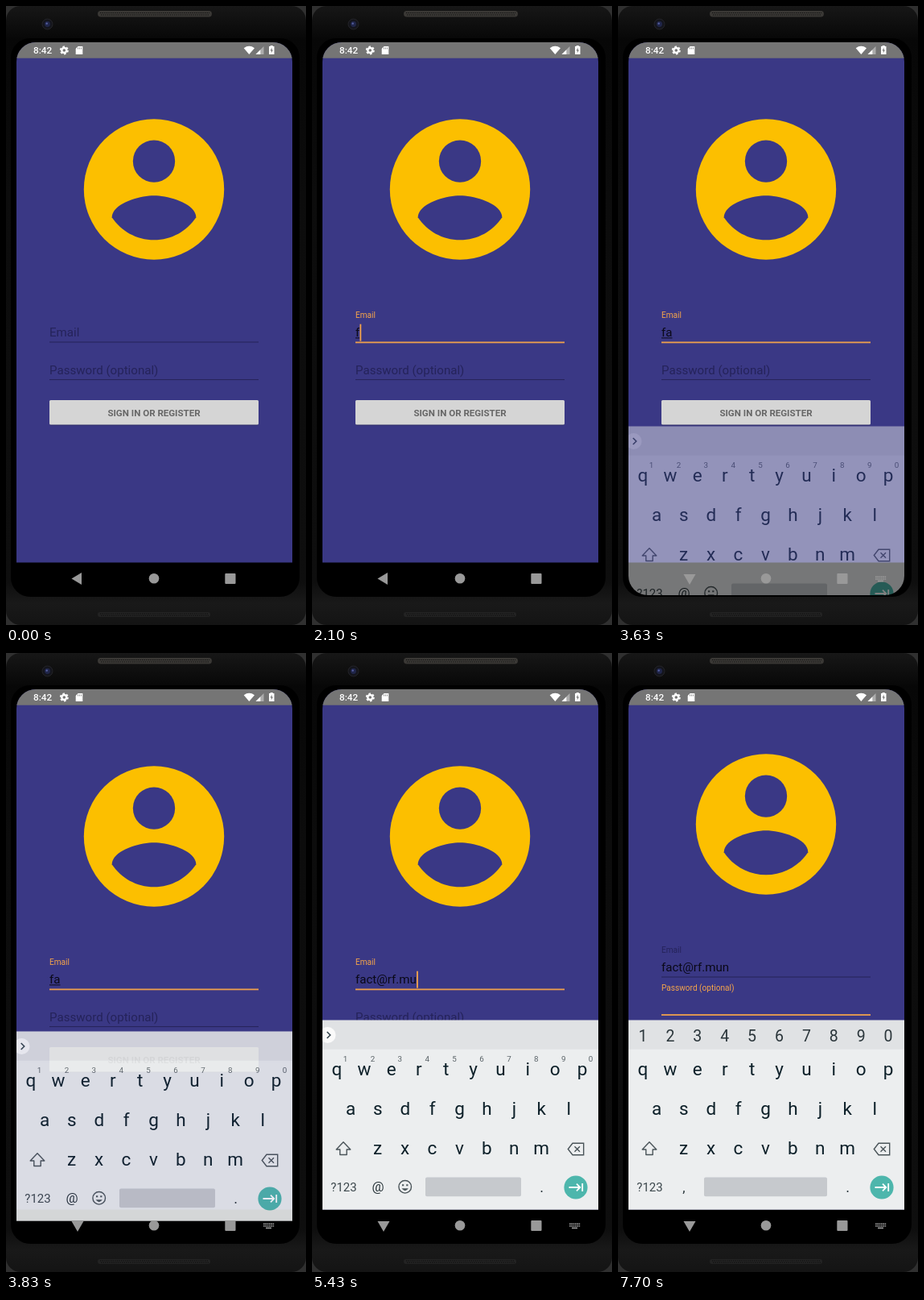
Write an HTML page that moves like this. It is 373 by 768 pixels and loops after 8000 ms.

```html
<!DOCTYPE html>
<html lang="en">
<head>
<meta charset="utf-8">
<title>Sign in</title>
<style>
html, body { margin: 0; width: 100%; height: 100%; overflow: hidden; background: #000; }
svg { display: block; width: 373px; height: 768px; }
text { font-family: Roboto, sans-serif; white-space: pre; }
.mid { text-anchor: middle; }
</style>
</head>
<body>
<svg id="stage" viewBox="0 0 373 768" xmlns="http://www.w3.org/2000/svg">
  <defs>
    <clipPath id="screen"><rect x="13" y="45" width="343" height="686" rx="24"/></clipPath>
    <linearGradient id="shell" x2="0" y2="1">
      <stop offset="0" stop-color="#171717"/><stop offset=".055" stop-color="#070707"/>
      <stop offset=".3" stop-color="#0c0c0c"/><stop offset=".93" stop-color="#0e0e0e"/>
      <stop offset=".965" stop-color="#191919"/><stop offset="1" stop-color="#141414"/>
    </linearGradient>
  </defs>

  <!-- phone body -->
  <rect width="373" height="768" fill="#303030"/>
  <rect x="0" y="0" width="373" height="768" rx="18" fill="url(#shell)"/>
  <rect x="6" y="40" width="359" height="693" rx="24" fill="#000"/>
  <rect x="114" y="6" width="142" height="7.5" rx="3.7" fill="#3a3835"/>
  <path d="M117 8.5H253M118 11H253" stroke="#111" stroke-width="1.2" stroke-dasharray="1.3 1.3"/>
  <rect x="114" y="752" width="140" height="6" rx="3" fill="#232323"/>
  <path d="M117 754H252M118 756.3H252" stroke="#0d0d0d" stroke-width="1.1" stroke-dasharray="1.3 1.3"/>
  <circle cx="51.5" cy="22.5" r="6.5" fill="#14151c" stroke="#242428"/>
  <circle cx="51.5" cy="22.5" r="3.4" fill="#20264a"/>
  <circle cx="50.7" cy="21.7" r="1.2" fill="#5560a0"/>

  <g clip-path="url(#screen)">
    <rect x="13" y="45" width="343" height="646" fill="#3a3885"/>

    <g id="page">
      <g transform="translate(79.36 122.86) scale(8.72)">
        <circle cx="12" cy="12" r="10" fill="#fcbf00"/>
        <circle cx="12" cy="8" r="3" fill="#3a3885"/>
        <path fill="#3a3885" d="M12 19.2c-2.5 0-4.71-1.28-6-3.22.03-1.99 4-3.08 6-3.08 1.99 0 5.97 1.09 6 3.08-1.29 1.94-3.5 3.22-6 3.22z"/>
      </g>
      <text id="mailHint" x="54">Email</text>
      <text id="mail" x="54" y="410" font-size="15.1" fill="#0a0918"></text>
      <rect id="compose" x="54" y="411.4" height="1" fill="#0a0918"/>
      <rect id="mailLine" x="54" width="260"/>
      <text id="passHint" x="54">Password (optional)</text>
      <rect id="passLine" x="54" width="260"/>
      <rect id="caret" width="1.8" height="21" fill="#f5a44a"/>
      <rect x="54" y="490" width="260" height="30.6" rx="2" fill="#2a2865"/>
      <rect x="54" y="489" width="260" height="30.5" rx="1.5" fill="#d5d5d5"/>
      <text class="mid" x="184" y="508.6" font-size="11.55" font-weight="700" fill="#676767">SIGN IN OR REGISTER</text>
    </g>

    <!-- status bar -->
    <rect x="13" y="45" width="343" height="19.7" fill="#757575"/>
    <text x="34" y="59" font-size="11.8" font-weight="500" fill="#fff">8:42</text>
    <g fill="#fff">
      <circle cx="72.3" cy="55" r="3" fill="none" stroke="#fff" stroke-width="2.4"/>
      <circle cx="72.3" cy="55" r="4.7" fill="none" stroke="#fff" stroke-width="1.6" stroke-dasharray="2.5 2.42"/>
      <path d="M89.6 50H95.3V60H86.7V53Z"/>
      <path d="M89.5 51.5v2m2-2v2m2-2v2" stroke="#757575" stroke-width=".8"/>
      <path d="M295.7 52.2Q302.3 47.4 309 52.2L302.3 60Z"/>
      <path d="M310.5 60L320.5 50V60Z" opacity=".4"/>
      <path d="M310.5 60L316.3 54.2V60Z"/>
      <path d="M328.7 50V49H331.7V50H333.5V60H327V50Z"/>
    </g>
    <path d="M330.7 51.5L328.5 55.5H330L329.7 58.6L332 54.6H330.5Z" fill="#757575"/>

    <rect x="13" y="690.5" width="343" height="41" fill="#000"/>

    <g id="keyboard">
      <rect x="13" y="455.7" width="343" height="235" fill="#eceeef"/>
      <rect x="13" y="455.7" width="343" height="36" fill="#e0e2e4"/>
      <g id="chip">
        <circle cx="19.5" cy="474" r="10" fill="#fafafa"/>
        <path d="M18.7 470L22.7 474L18.7 478" fill="none" stroke="#37474f" stroke-width="1.6"/>
      </g>
      <text id="suggest" class="mid" x="183" y="479.5" font-size="15.1" fill="#5d6468"></text>
      <g id="numRow" fill="#2b363b" font-size="19.5"></g>
      <g id="hints" fill="#596267" font-size="9.8"></g>
      <g id="letters" fill="#0d2029" font-size="22.5"></g>
      <path id="shift" d="M39 606.8L47.8 616H43.2V622.5H34.8V616H30.2Z" stroke="#4a5459" stroke-width="1.4" stroke-linejoin="round"/>
      <path d="M324 608.3H337.7V622.7H324L318.3 615.5ZM326.5 612.2L333 618.8M333 612.2L326.5 618.8" fill="none" stroke="#4a5459" stroke-width="1.4"/>
      <text class="mid" x="39.5" y="668" font-size="15" fill="#3c474c">?123</text>
      <text id="sign" class="mid" x="82" font-size="16.8" fill="#263238"></text>
      <g id="smile" fill="none" stroke="#4a5459" stroke-width="1.4">
        <circle cx="115.7" cy="662.3" r="7.8"/>
        <path d="M111.6 664.3Q115.7 670 119.8 664.3Z" fill="#4a5459" stroke="none"/>
        <path d="M112 660.2h2.2m3 0h2.2" stroke-width="2"/>
      </g>
      <rect id="space" y="650.5" height="23.7" rx="2" fill="#c6c9cd"/>
      <text class="mid" x="285.5" y="669" font-size="18" fill="#263238">.</text>
      <circle cx="328" cy="663" r="14.6" fill="#4db6ac"/>
      <path d="M319.5 663H333M329 658.7L333.3 663L329 667.3M336.2 658V668" fill="none" stroke="#fff" stroke-width="1.8"/>
    </g>

    <!-- navigation bar -->
    <g fill="#999">
      <path id="back"/>
      <circle cx="184" cy="710.3" r="6.3"/>
      <rect x="272.3" y="704" width="13.2" height="13" rx="1"/>
      <g id="imeIcon">
        <path d="M320 708.3H333.2M320 711H333.2" stroke="#999" stroke-width="1.7" stroke-dasharray="1.7 .6"/>
        <rect x="323" y="712.6" width="7" height="1.7"/>
      </g>
    </g>
  </g>
</svg>

<script>
const LOOP = 8000;
const $ = id => document.getElementById(id);
const set = (id, attrs) => { for (const k in attrs) $(id).setAttribute(k, attrs[k]); };
const show = (id, on) => $(id).style.display = on ? '' : 'none';
const mix = (a, b, k) => a + (b - a) * k;

// Each track lists [start in ms, value]; values hold until the next step.
const word = 'fact', address = word + '@rf.mun';
const tracks = {
  typed: [[0, 0], [2100, 1], [2630, 2], [3930, 3], [4300, 4], [4630, 5], [5030, 6], [5130, 7], [5230, 9], [5430, 10], [5560, 11]],
  caret: [[0, 0], [500, 1], [1030, 0], [1430, 1], [1960, 0], [2100, 1], [3160, 0], [3930, 1], [6760, 0], [7500, 1], [7700, 0]],
  focus: [[0, ''], [500, 'mail'], [6300, 'pass']],
  mailUp: [[0, 0], [700, .35], [770, .75], [830, 1]],
  passUp: [[0, 0], [6560, 1]],
  pan: [[0, 0], [6430, -3], [6560, -15]],
  ime: [[0, 0], [2160, 1]],
  keysY: [[0, 66], [3830, 14], [3930, 0]],
  keysAlpha: [[0, 0], [3630, .5], [3830, .9], [3930, 1]],
  suggest: [[0, 0], [4030, 3], [4300, 4], [4830, 0]],
  compose: [[0, 1], [4830, 0]],
  caps: [[0, 0], [4500, 1], [4630, 0]],
  numeric: [[0, 0], [7360, 1]]
};
const at = (track, t) => track.reduce((v, [start, next]) => t >= start ? next : v, track[0][1]);

function addText(parent, str, x, y) {
  const el = document.createElementNS('http://www.w3.org/2000/svg', 'text');
  el.setAttribute('class', 'mid');
  el.setAttribute('x', x);
  el.setAttribute('y', y);
  el.textContent = str;
  $(parent).append(el);
  return el;
}

const keys = [];
[['qwertyuiop', 31], ['asdfghjkl', 48], ['zxcvbnm', 81.7]].forEach(([row, x], r) =>
  [...row].forEach((c, i) => keys.push([addText('letters', c, x + i * 33.9, 524 + r * 49), c])));
[...'1234567890'].forEach((c, i) => {
  addText('hints', c, 41.5 + i * 33.9, 507.3);
  addText('numRow', c, 31 + i * 33.9, 481.5);
});

function drawField(id, dy, up, focused) {
  const ink = [37, 35, 90], accent = [245, 164, 74];
  const k = focused ? up : 0;
  set(id + 'Hint', {
    y: mix(410, 387, up) + dy,
    'font-size': mix(15.1, 10.1, up),
    fill: `rgb(${ink.map((v, i) => Math.round(mix(v, accent[i], k)))})`
  });
  set(id + 'Line', {
    y: 416.5 + dy,
    height: focused ? 1.8 : 1,
    fill: focused ? '#eea04c' : '#252358'
  });
}

function draw(t) {
  const s = {};
  for (const k in tracks) s[k] = at(tracks[k], t);
  const onMail = s.focus === 'mail', onPass = s.focus === 'pass';

  set('page', { transform: `translate(0 ${s.pan})` });
  drawField('mail', 0, s.mailUp, onMail);
  drawField('pass', 46.6, s.passUp, onPass);

  $('mail').textContent = address.slice(0, s.typed);
  const width = s.typed ? $('mail').getComputedTextLength() : 0;
  const marked = s.typed ? $('mail').getSubStringLength(0, Math.min(s.typed, word.length)) : 0;
  show('compose', s.compose && s.typed);
  set('compose', { width: marked });
  show('caret', s.caret);
  set('caret', { x: 54.2 + (onMail ? width : 0), y: onPass ? 441.5 : 394.7 });

  set('keyboard', { transform: `translate(0 ${s.keysY})`, opacity: s.keysAlpha });
  $('suggest').textContent = word.slice(0, s.suggest);
  for (const [el, c] of keys) el.textContent = s.caps ? c.toUpperCase() : c;
  set('letters', { transform: `translate(0 ${s.caps ? 1 : 0})` });
  set('shift', { fill: s.caps ? '#4a5459' : 'none' });
  show('chip', !s.numeric);
  show('hints', !s.numeric);
  show('smile', !s.numeric);
  show('numRow', s.numeric);
  $('sign').textContent = s.numeric ? ',' : '@';
  set('sign', { y: s.numeric ? 668.5 : 667.5 });
  set('space', s.numeric ? { x: 107, width: 153 } : { x: 141, width: 119 });

  set('back', { d: s.ime ? 'M81.5 705H96.5L89 718Z' : 'M81.5 710.5L94 703V718Z' });
  show('imeIcon', s.ime);
}

function tick() {
  draw(performance.now() % LOOP);
  requestAnimationFrame(tick);
}
tick();
</script>
</body>
</html>
```
